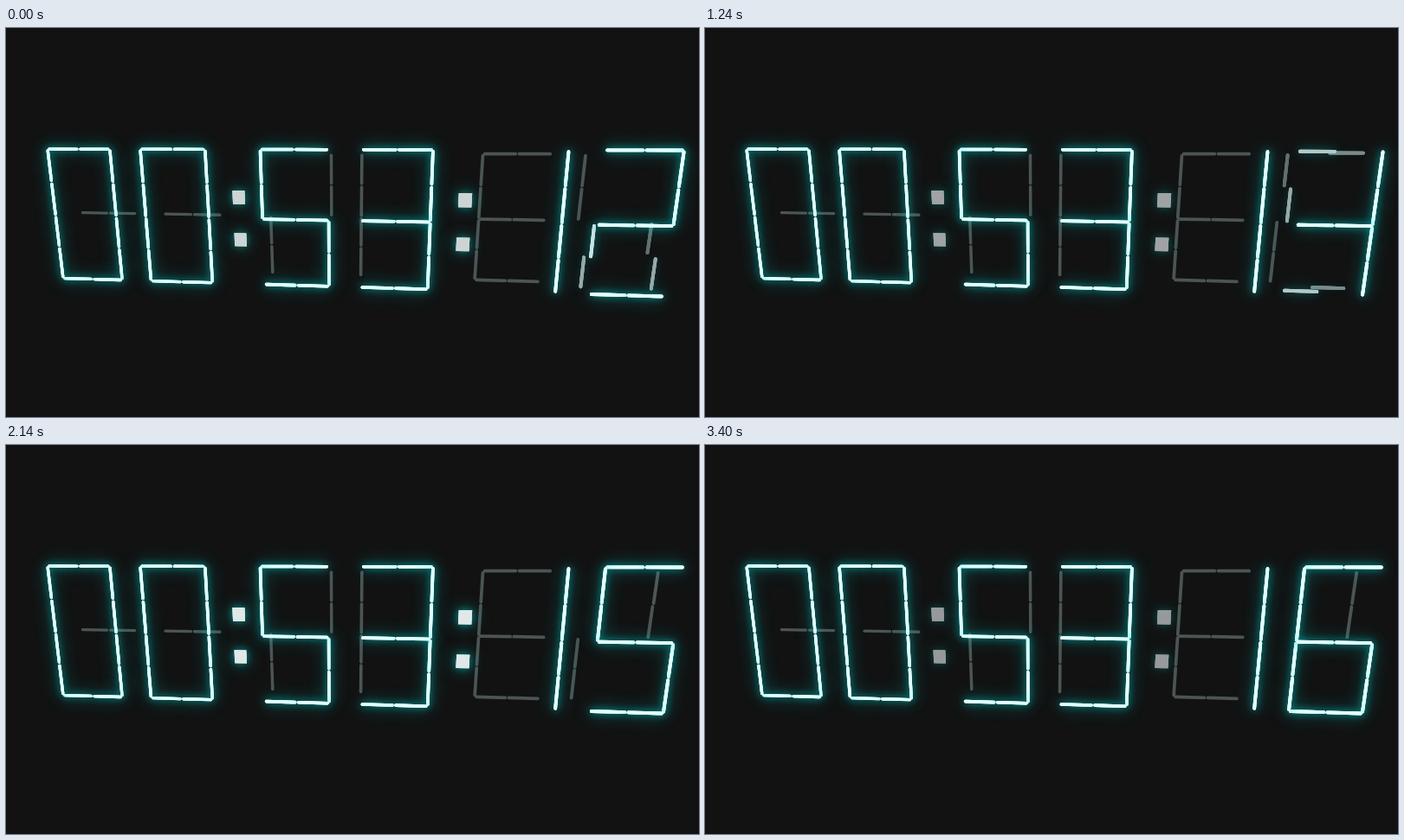
Recreate the animation shown at these times as an HTML page with a canvas. Size 800 by 450 pixels, loop 3.5 s.

```html
<!DOCTYPE html>
<html lang="en">
<head>
<meta charset="utf-8">
<title>Neon clock</title>
<style>
html, body { margin: 0; width: 100%; height: 100%; overflow: hidden; background: #121212; }
canvas { display: block; width: 800px; height: 450px; }
</style>
</head>
<body>
<canvas id="stage" width="800" height="450"></canvas>
<script>
const ctx = document.getElementById('stage').getContext('2d');
const LOOP = 3500, STEP = 89, LAST_STEP = 38;
const DIM = [76, 84, 84], LIT = [228, 255, 255];

// The clock face is a unit square seen in perspective; digits sit along x
const WIDTH = 0.11, PITCH = 0.1628, COLON = 0.0385, MIDDLE = 0.503;
const SEGMENTS = {
  a: [0, 0, 1, 0], b: [1, 0, 1, MIDDLE], c: [1, MIDDLE, 1, 1], d: [0, 1, 1, 1],
  e: [0, MIDDLE, 0, 1], f: [0, 0, 0, MIDDLE], g: [0, MIDDLE, 1, MIDDLE]
};
const SHAPES = ['abcdef', 'bc', 'abged', 'abgcd', 'fgbc', 'afgcd', 'afgecd'];
const STILL = [0, 0, 5, 3, 1];

// The seconds digit: next value, start, duration
const FIRST = 2;
const CHANGES = [[3, -600, 970], [4, 935, 500], [5, 1500, 500], [6, 2600, 600]];

const mix = (a, b, k) => a + (b - a) * k;
const rgb = (p, q, k) => `rgb(${p.map((v, i) => Math.round(mix(v, q[i], k)))})`;
const ease = u => (1 - Math.cos(Math.PI * Math.min(1, Math.max(0, u)))) / 2;
const slot = i => i * PITCH + Math.floor(i / 2) * COLON;
const has = (digit, name) => SHAPES[digit].includes(name) ? 1 : 0;

// Projective map of the unit square onto a quad: corners clockwise from top left
function quadMap([[x0, y0], [x1, y1], [x2, y2], [x3, y3]]) {
  const ax = x1 - x2, ay = y1 - y2, bx = x3 - x2, by = y3 - y2;
  const sx = x0 - x1 + x2 - x3, sy = y0 - y1 + y2 - y3;
  const det = ax * by - bx * ay;
  const g = (sx * by - bx * sy) / det, h = (ax * sy - sx * ay) / det;
  return (u, v) => {
    const w = 1 + g * u + h * v;
    return [
      (x0 + (x1 - x0 + g * x1) * u + (x3 - x0 + h * x3) * v) / w,
      (y0 + (y1 - y0 + g * y1) * u + (y3 - y0 + h * y3) * v) / w
    ];
  };
}
const face = quadMap([[48, 140], [782, 141.5], [758, 310.5], [66, 289.5]]);

// Unlit parts sink back toward the vanishing point
function project(u, v, k) {
  const [x, y] = face(u, v);
  return [412 + (x - 412) * mix(0.918, 1, k), 183 + (y - 183) * mix(0.893, 1, k)];
}

// Right and lower halves lead, upright segments follow the flat ones
function level(name, half, t) {
  let k = has(FIRST, name);
  const lag = (half ? 0 : 0.24) + ('ad'.includes(name) ? 0 : 0.12);
  for (const [digit, start, span] of CHANGES) {
    k = mix(k, has(digit, name), ease((t - start) / span - lag));
  }
  return k;
}

function withGlow(k, draw) {
  for (const [blur, alpha] of [[20, 0.7], [8, 0.75]]) {
    if (k < 0.02) break;
    ctx.shadowBlur = blur;
    ctx.shadowColor = `rgba(0,220,220,${alpha * k})`;
    draw();
  }
  ctx.shadowBlur = 0;
  ctx.shadowColor = 'transparent';
  draw();
}

function bar({ left, name, half, k }) {
  const [u1, v1, u2, v2] = SEGMENTS[name];
  const [x1, y1] = project(left + u1 * WIDTH, v1, k);
  const [x2, y2] = project(left + u2 * WIDTH, v2, k);
  const len = Math.hypot(x2 - x1, y2 - y1);
  const end = 2 / len, gap = 2 / len;
  const from = half ? 0.5 + gap : end, to = half ? 1 - end : 0.5 - gap;
  ctx.strokeStyle = rgb(DIM, LIT, k);
  ctx.lineWidth = mix(3.3, 3.9, left);
  withGlow(k * k, () => {
    ctx.beginPath();
    ctx.moveTo(mix(x1, x2, from), mix(y1, y2, from));
    ctx.lineTo(mix(x1, x2, to), mix(y1, y2, to));
    ctx.stroke();
  });
}

function dot(u, v, k) {
  const dx = 0.0102, dy = 0.049;
  ctx.fillStyle = rgb([150, 153, 153], [246, 255, 255], k);
  withGlow(0.3 + 0.6 * k, () => {
    ctx.beginPath();
    for (const [i, j] of [[-1, -1], [1, -1], [1, 1], [-1, 1]]) {
      ctx.lineTo(...face(u + i * dx, v + j * dy));
    }
    ctx.fill();
  });
}

function render(t) {
  ctx.fillStyle = '#121212';
  ctx.fillRect(0, 0, 800, 450);
  ctx.lineCap = 'round';

  const bars = [];
  for (let i = 0; i <= STILL.length; i++) {
    for (const name in SEGMENTS) {
      for (const half of [0, 1]) {
        const k = i < STILL.length ? has(STILL[i], name) : level(name, half, t);
        // The narrow 1 hides nothing; other digits keep every sunken part
        bars.push({ left: slot(i), name, half, k });
      }
    }
  }
  bars.sort((p, q) => p.k - q.k).forEach(bar);

  const glow = (1 + Math.cos((t - 450) / 1000 * Math.PI)) / 2;
  for (const i of [2, 4]) {
    const u = (slot(i - 1) + WIDTH + slot(i)) / 2 + 0.007;
    for (const v of [0.345, 0.66]) dot(u, v, glow);
  }
}

let begin = null, shown = -1;
function loop(now) {
  if (begin === null) begin = now;
  const t = (now - begin) % LOOP;
  const step = Math.min(LAST_STEP, Math.floor((t + 10) / STEP));
  if (step !== shown) {
    shown = step;
    render(step * STEP);
  }
  requestAnimationFrame(loop);
}
render(0);
requestAnimationFrame(loop);
</script>
</body>
</html>
```
